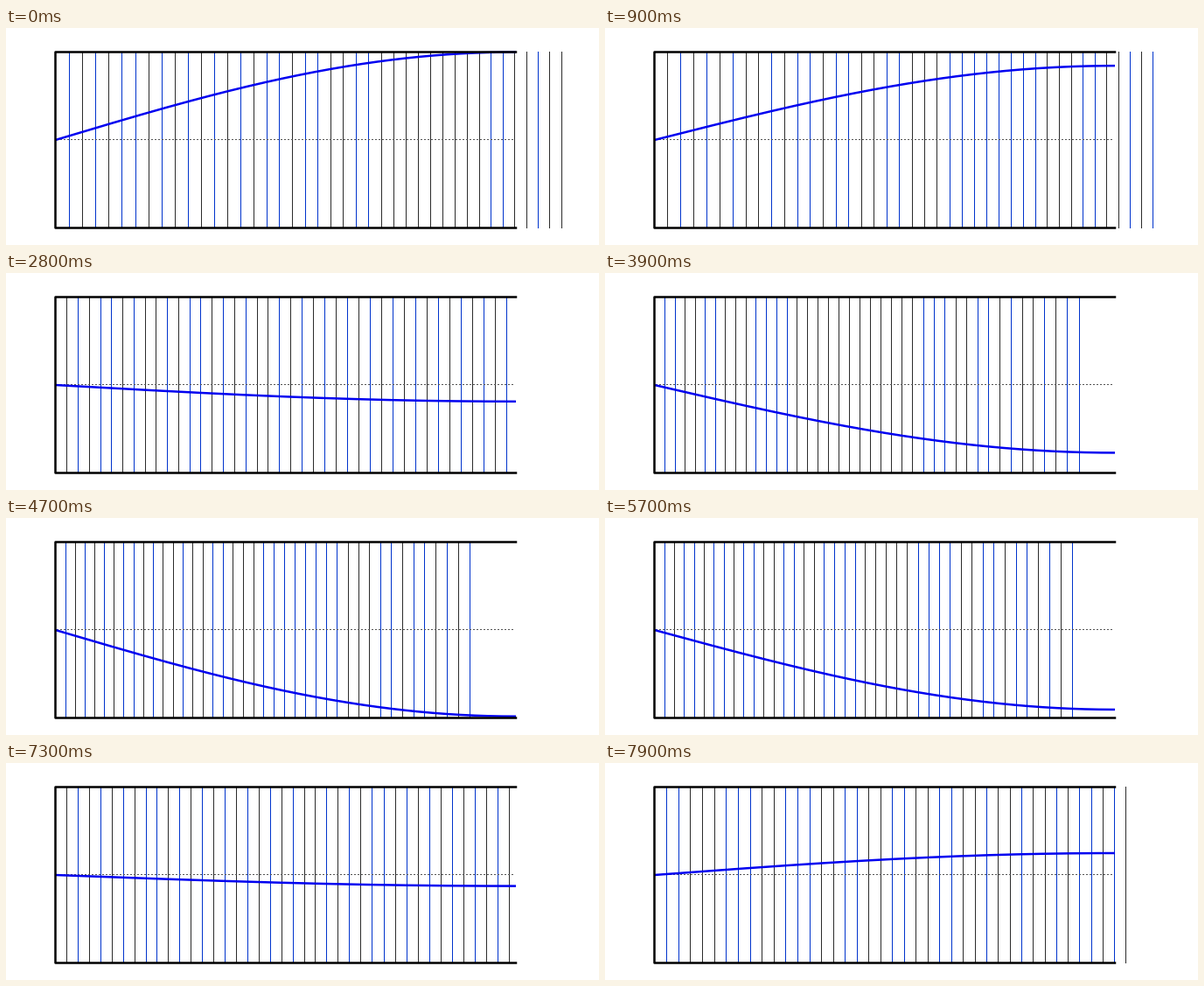
A matplotlib script for the animation above (8 s loop, 678 by 248 pixels).

```python
import numpy as np
import matplotlib.pyplot as plt
from matplotlib.animation import FuncAnimation

W, H, DPI = 678, 248, 100
PX = 72 / DPI                 # one pixel in points
FRAMES, STEP, PERIOD = 80, 100, 100

LEFT, RIGHT, TOP, BOTTOM = 56.5, 583, 27.5, 228.5
MID = (TOP + BOTTOM) / 2
N = 40                        # air layers in the half-open pipe
START, LENGTH = 56.5, 525.5
SHIFT, SWING = LENGTH / 10, 100.5
BLUE, DARK = "#0033cc", "#2b2b2b"

fig = plt.figure(figsize=(W / DPI, H / DPI), dpi=DPI, facecolor="white")
ax = fig.add_axes([0, 0, 1, 1])
ax.set(xlim=(0, W), ylim=(H, 0))
ax.axis("off")

u = np.arange(1, N + 1) / N
s = np.linspace(0, 1, 200)
mode = np.sin(np.pi / 2 * s)

layers = ax.vlines(np.zeros(N), 27, 229, lw=PX, zorder=1)
layers.set(snap=False, capstyle="butt")

ax.plot([58, 582], [127.5] * 2, color="#555555", lw=PX, snap=False,
        dashes=(2, 2), dash_capstyle="butt", zorder=2)
wave, = ax.plot([], [], color="#0000f0", lw=2.5 * PX, snap=False,
                solid_capstyle="butt", zorder=3)
ax.plot([RIGHT, LEFT, LEFT, RIGHT], [TOP, TOP, BOTTOM, BOTTOM], color="black",
        lw=2.5 * PX, snap=False, solid_capstyle="projecting",
        solid_joinstyle="round", zorder=4)


def update(k):
    a = np.cos(2 * np.pi * k / PERIOD)
    x = START + LENGTH * u + a * SHIFT * np.sin(np.pi / 2 * u)
    cols = np.rint(x).astype(int)
    layers.set_segments([[(c + 0.5, 27), (c + 0.5, 229)] for c in cols])
    # layers take their colour from the parity of their column
    layers.set_color([DARK if c % 2 else BLUE for c in cols])
    wave.set_data(LEFT + (RIGHT - LEFT) * s, MID - a * SWING * mode)
    return layers, wave


anim = FuncAnimation(fig, update, frames=FRAMES, interval=STEP,
                     repeat=True, repeat_delay=0)
plt.show()
```
